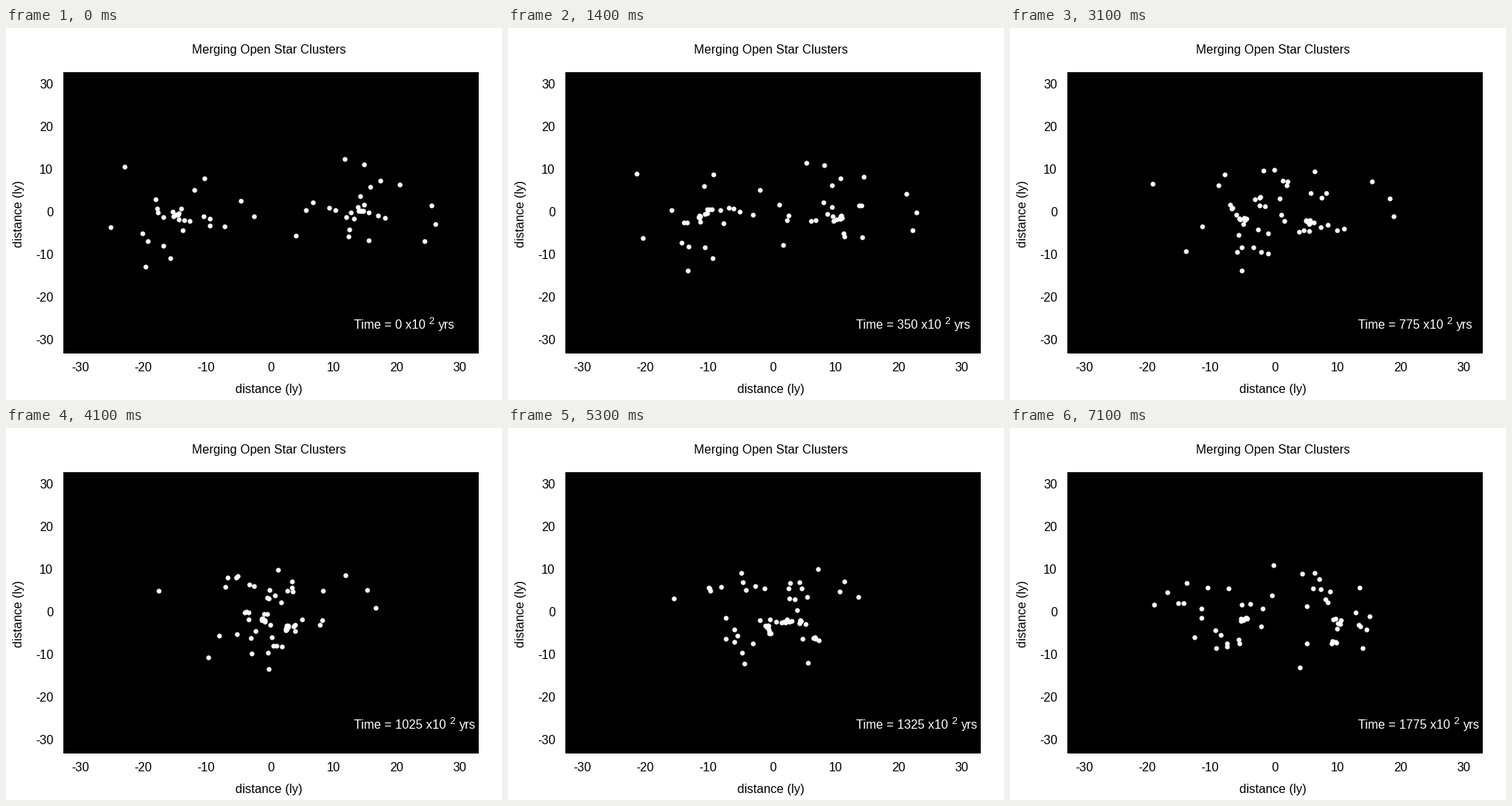
Recreate the animation shown at these times as a matplotlib script. Size 640 px wide and 480 px high, loop 7200 ms.

```python
import numpy as np
import matplotlib.pyplot as plt
from matplotlib.animation import FuncAnimation
from matplotlib.patches import Rectangle

FRAMES, INTERVAL = 72, 100
YEARS_PER_FRAME = 25
LEFT, TOP, WIDTH, HEIGHT = 74, 57, 536, 363   # plot area in pixels
RANGE = 33                                    # light years to each edge

STARS = 30        # per cluster
DRIFT = 0.265     # approach speed, light years per frame
SPIN = 0.2        # orbital speed, light years per frame
PULL = 0.012      # gravity of one star
SOFTENING = 0.12
STEPS = 20        # integration steps per frame

rng = np.random.default_rng(4)


def cluster(center, outer, drift):
    """Dense core and a few outer stars, all turning counterclockwise."""
    n = STARS - len(outer)
    radius = 8.5 * ((np.arange(n) + 0.5) / n) ** 1.6
    angle = rng.uniform(0, 2 * np.pi, n)
    core = center + radius[:, None] * np.column_stack([np.cos(angle),
                                                       np.sin(angle)])
    place = np.vstack([core, outer])
    x, y = (place - center).T
    speed = SPIN * np.column_stack([-y, x]) / np.hypot(x, y)[:, None]
    return place, speed + (drift, 0)


def gravity(place):
    gap = place[None] - place[:, None]
    dist2 = (gap ** 2).sum(axis=2) + SOFTENING ** 2
    return PULL * (gap / dist2[..., None] ** 1.5).sum(axis=1)


def simulate(place, speed):
    """Star places for every frame, by leapfrog integration."""
    dt = 1 / STEPS
    track = [place]
    pull = gravity(place)
    for _ in range(FRAMES - 1):
        for _ in range(STEPS):
            speed = speed + pull * dt / 2
            place = place + speed * dt
            pull = gravity(place)
            speed = speed + pull * dt / 2
        track.append(place)
    return track


def to_pixels(x, y):
    return (LEFT + WIDTH * (x + RANGE) / (2 * RANGE),
            TOP + HEIGHT * (RANGE - y) / (2 * RANGE))


west = cluster((-15.1, -0.3),
               [(-23.3, 11), (-25.5, -3.2), (-2.8, -0.8), (-4.9, 3),
                (-20, -12.6), (-16.1, -10.6), (-10.7, 8.1), (-19.7, -6.6)],
               DRIFT)
east = cluster((14.5, 0.5),
               [(3.9, -5.2), (5.5, 0.8), (11.6, 12.8), (14.7, 11.5),
                (20.4, 6.8), (26, -2.5), (24.3, -6.5), (25.4, 1.9)],
               -DRIFT)
track = simulate(*map(np.vstack, zip(west, east)))

fig = plt.figure(figsize=(6.4, 4.8), dpi=100, facecolor="white")
ax = fig.add_axes([0, 0, 1, 1])
ax.set_xlim(0, 640)
ax.set_ylim(480, 0)
ax.axis("off")
ax.add_patch(Rectangle((LEFT, TOP), WIDTH, HEIGHT,
                       color="black", lw=0, antialiased=False))


def label(x, y, text, ha="left", size=16, color="black", **kw):
    return ax.text(x, y, text, ha=ha, va="baseline", color=color,
                   family="Liberation Sans", size=size * 0.72, **kw)


label(339.5, 33, "Merging Open Star Clusters", "center")
label(339, 471, "distance (ly)", "center")
label(20.5, 239.5, "distance (ly)", "center", rotation=90,
      rotation_mode="anchor")
for v in range(-30, 31, 10):
    x, y = to_pixels(v, v)
    sign_shift = 2.6 if v < 0 else 0.3
    label(x - sign_shift, 443, str(v), "center")
    label(61, y + 4.5, str(v), "right")

clock = label(449, 388, "", color="white")
power = label(545, 382, "2", size=12.8, color="white")
unit = label(557.5, 388, "yrs", color="white")
dots, = ax.plot([], [], "o", color="white", ms=6.2 * 0.72, mew=0,
                antialiased=False)


def update(frame):
    place = track[frame]
    inside = (np.abs(place) < RANGE).all(axis=1)
    x, y = to_pixels(*place[inside].T)
    dots.set_data(np.floor(x) + 0.5, np.floor(y) + 0.5)
    years = str(frame * YEARS_PER_FRAME)
    shift = 9 * (len(years) - 1)
    clock.set_text(f"Time = {years} x10")
    power.set_x(545 + shift)
    unit.set_x(557.5 + shift)
    return dots, clock, power, unit


anim = FuncAnimation(fig, update, frames=FRAMES, interval=INTERVAL,
                     repeat=True, repeat_delay=0)
plt.show()
```
